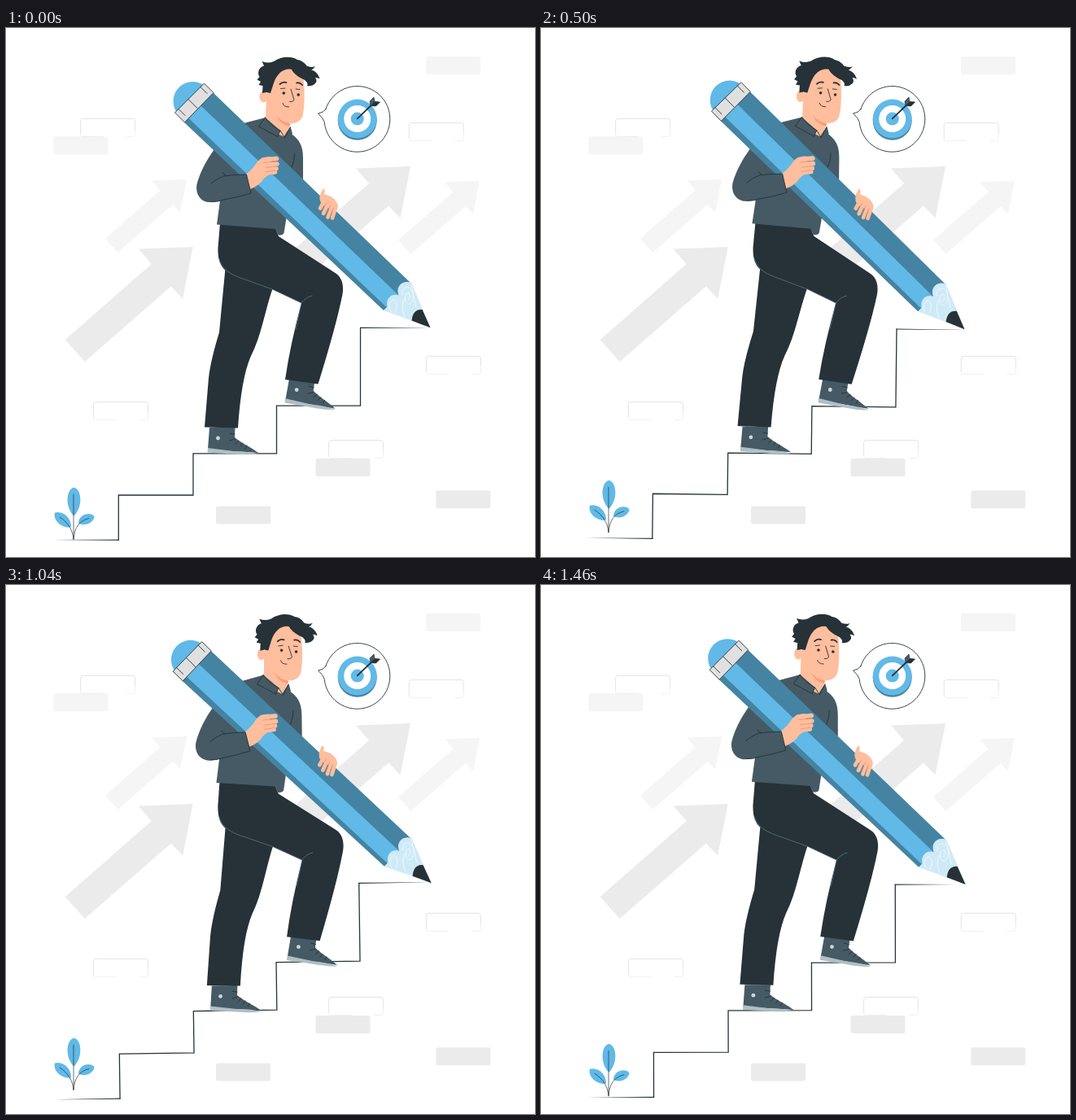
These frames come from a looping animation (650x650 px, 1.5 s). An HTML page:

```html
<!DOCTYPE html>
<html lang="en">
<head>
<meta charset="utf-8">
<title>Climbing to the goal</title>
<style>
  html, body { margin: 0; width: 100%; height: 100%; overflow: hidden; background: #fff; }
  svg { display: block; width: 100vw; height: 100vh; }
  .ink { fill: #263238; }
  .blue { fill: #61b9e7; }
  .deep { fill: #4583a2; }
  .shirt { fill: #455a64; }
  .skin { fill: #ffbe9d; }
  .line { fill: none; stroke: #263238; stroke-width: .9; stroke-linecap: round; stroke-linejoin: round; }
  .finger { fill: none; stroke: #ffbe9d; stroke-width: 5.6; stroke-linecap: round; }
  .crease { fill: none; stroke: #e58a68; stroke-width: .7; stroke-linecap: round; }
</style>
</head>
<body>
<svg viewBox="0 0 650 650">
  <defs>
    <path id="arrow" d="M0 0L-67 2.5L-51 21L-157 114L-133 141L-27 48.5L-12.5 63.5Z"/>
    <rect id="block" width="67" height="22" rx="2.5"/>
    <g id="card" fill="none" stroke="#e0e0e0">
      <path stroke-width=".9" d="M0 19V3Q0 0 3 0H64Q67 0 67 3V13"/>
      <path stroke-width=".5" d="M67 13V19Q67 22 64 22H56M28 22H3Q0 22 0 19"/>
    </g>
    <g id="shoe">
      <path class="shirt" d="M2-25H33.5L33-13C41-6 53-1 62 6L0 2Z"/>
      <path fill="#b0bec5" d="M0 0L32 4Q50 4 62.5 7.5Q50 9 32 7.5L-.5 5.5Z"/>
      <circle cx="12.5" cy="-12" r="2.4" fill="#cfd8dc"/>
      <path class="line" d="M27-18L33-17M27-9L33-11M34-5L38-9M40-2L43-6M46 1L48-3"/>
    </g>
  </defs>

  <g fill="#f5f5f5">
    <use href="#block" x="516" y="35"/>
    <use href="#block" x="58.3" y="133.3"/>
    <use href="#arrow" transform="translate(222 186) scale(.637)"/>
    <use href="#arrow" transform="translate(582 188) scale(.637)"/>
  </g>
  <g fill="#ebebeb">
    <use href="#block" x="380.5" y="529"/>
    <use href="#block" x="528.3" y="568.3"/>
    <use href="#block" x="258" y="587.4"/>
    <use href="#arrow" x="229.7" y="269"/>
    <use href="#arrow" x="497" y="170"/>
  </g>
  <use href="#card" x="91.6" y="111.4"/>
  <use href="#card" x="495.2" y="116.6"/>
  <use href="#card" x="516.3" y="403.3"/>
  <use href="#card" x="107.5" y="459.4"/>
  <use href="#card" x="396.6" y="506.6"/>

  <g id="bubble">
    <path class="line" style="fill:#fff" d="M392.8 100A40.4 40.4 0 1 1 391.2 115.5Q390 111 383.6 105Q390 104 392.8 100Z"/>
    <circle class="deep" cx="431.7" cy="113.8" r="24"/>
    <circle class="blue" cx="431.7" cy="111.6" r="24"/>
    <circle cx="431.7" cy="111.6" r="16.5" fill="#fff"/>
    <circle class="blue" cx="431.7" cy="111.6" r="8"/>
    <path class="line" style="stroke-width:1.8" d="M431.7 111.4L453 91"/>
    <path class="shirt" stroke="#263238" stroke-width=".7" d="M448 95.5L447 90L452 85L453 90.5L459.5 91L454.5 96Z"/>
    <path class="ink" d="M448 95.5L453 90.5L459.5 91L454.5 96Z"/>
  </g>

  <g id="stairs">
    <path class="line" style="stroke-width:1.3;stroke-linejoin:miter" d="M138.3 629V574H230V522.8H332.5V464.2H435.5V368.3"/>
    <path class="ink" d="M57 629.1L139 628.5V629.8ZM435 367.7L521 368.4L435 368.9Z"/>
  </g>

  <g id="climber">
    <use href="#shoe" x="248" y="516"/>
    <use href="#shoe" transform="translate(343.5 455.2) rotate(6)"/>
    <path class="ink" d="M270 290L262 374Q251 410 249 430L244 490.5L285 491.5Q289 430 301 403C314 378 318.5 345 329 316Z"/>
    <path class="ink" d="M263 240L331 246L335 256L403 300C412 305 415.5 314 413.5 327Q406 365 383.5 437.5L343 432Q349 390 363 338L327 321L284 306C266 299 260 290 260.5 270Z"/>
    <path class="line" style="stroke:#607d8b;stroke-width:.7" d="M262 284C266 297 275 302 288 307L327 321L363 338Q368 331 376 329M363 338L356 370"/>

    <path class="shirt" d="M285 119L294 116.5L319 110L349 129C361 137 365 145 365 160V200L345 230L341.5 252Q340 255 334.5 254.5L331 247L259 241.5L264 205L255 150Z"/>
    <path class="shirt" d="M259 145C247 160 238 178 234.5 192C232.5 203 238 212 248 214C258 215 275 209 301 203L296 180L286 165Z"/>
    <path class="line" d="M252 213.5Q260 214 268 211M354.5 154Q355 163 351 171"/>

    <g id="head">
      <path class="skin" d="M320 84L319 110Q325 128 342.5 134L349.5 118Z"/>
      <path fill="#ff9b74" d="M332 107Q338 116 349.5 117.5L348 121Q336 118 332 107Z"/>
      <ellipse class="skin" cx="316.5" cy="84.5" rx="5" ry="7"/>
      <path class="skin" d="M322 62C334 40 362 44 366 66C367 83 367 97 364.5 108C361 118 349 120 340 113Q330 107 320 92Z"/>
      <path class="ink" d="M315 80L315.5 71L310.5 70L313 66L308.5 63.5L311.5 60C308 55 311 48 317 46.5L314.5 41Q322 44 329 41C338 35 350 34 358 39Q365 40 369.5 46.5Q375 49 380 47Q377 51 375 51.5C380 52.5 384 57 385.5 62.5Q382 60.5 380 61Q383 65 380 68Q376 72 370 71Q372 68 367 64C361 61 354 57 351 51C342 49 333 55 328.5 69L325 80L320 79Z"/>
      <path class="line" style="stroke-width:1.8" d="M336.5 69Q340 65.5 344.5 67M357 67.5Q361 66.5 364 70"/>
      <path class="line" d="M337.5 74.5L343 74M356 75L361 75.5M350 75L354 88.5Q352 91.5 348.5 90.5M340 92.5Q341 97 347.5 97"/>
      <circle class="ink" cx="341.3" cy="80" r="1.8"/>
      <circle class="ink" cx="359.2" cy="82" r="1.8"/>
      <path class="shirt" d="M318.5 110L310.5 121L333.5 133.5L337 126ZM349.5 121L341 134L346 136L352 130Z"/>
      <path class="line" d="M318.5 110L310.5 121L333.5 133.5L337 126Q324 119 318.5 110M337 126L342.5 135L349 122"/>
    </g>

    <g id="pencil">
      <circle class="blue" cx="229.5" cy="90" r="24"/>
      <path class="deep" d="M254 79L498 314L464 347L219 116Z"/>
      <path class="blue" d="M239 95L483 329L469 344.5L224.5 111Z"/>
      <path fill="#cfeaf7" d="M498 313L521.5 368L464 347Q468 345 468.5 342C466 333 474 325 482.5 328.5C478 317 488 309 498 313Z"/>
      <path fill="none" stroke="#fff" stroke-width=".6" d="M473 349Q467 338 476 334Q483 337 478 350M490 355Q484 340 490 331M487 328C485 317 497 315 500 325C502 337 495 344 491 336Q489 327 495 325Q498 330 494 335M504 343L498 316"/>
      <path class="ink" d="M521.5 368.3L511.5 346Q500 345 498.5 359.5Z"/>
      <path fill="#e0e0e0" stroke="#263238" stroke-width=".9" stroke-linejoin="round" d="M207.5 104L243.5 68L255 79.5L219.5 116Z"/>
      <path class="line" d="M212 99.5L220 107.500M224 87.500L235 98.500M239 72.500L247 80.500"/>
    </g>

    <g id="hands">
      <path class="skin" d="M293 181Q303 174 309 164Q314 158 325 158L328 178Q318 182 314 189Q308 195 300 198Z"/>
      <path class="finger" d="M316 162L332.5 160.5M318 168L333 167M318 174L332 172.5M317 178L330.5 177"/>
      <path class="crease" d="M317 165.5L333 163.7M319 171.5L333 170M319 177L331 175"/>
      <path class="shirt" d="M266 182Q280 180 295.5 180L301 203L270 210.5Z"/>
      <path class="line" d="M268 211Q285 208 301 203L295.5 180Q280 180 267 182Q258 186 252 191M266 178L270 181"/>
      <path class="skin" d="M390 197Q393 199 391 204L399 207Q407 212 408 219L402 224L388 217Q382 208 390 197Z"/>
      <path class="finger" style="stroke-width:4.6" d="M392 211L386 221.500M397 213L390 228M402 216L395.500 232.500M405.500 220L401 233.500"/>
      <path class="crease" d="M394 215L388.5 223.5M398.5 218L393 229M402.5 221L398 232"/>
    </g>
  </g>

  <g id="plant">
    <path class="blue" d="M83.5 564.5C93.5 567 94.500 589 83.5 599.5C72.500 589 73.500 567 83.5 564.5ZM60 595.5C70 592.500 80.500 602 80 613C70 616 57 605 60 595.5ZM89 608.5C89 598 103 593.500 108.5 600C108 608 97 613 89 608.5Z"/>
    <path class="line" style="stroke-width:.7" d="M83 628.5V573M83 628C82 617 76 607 66 601M83 628C84 614 90 605 102 602.5"/>
  </g>
</svg>
<script>
  const LOOP = 1500;
  const get = id => document.getElementById(id);
  const stairs = get('stairs'), climber = get('climber'), plant = get('plant');

  // Triangle wave: 0 at p = 0, 1 at p = 0.25, -1 at p = 0.75
  const triangle = p => p < .25 ? 4 * p : p < .75 ? 2 - 4 * p : 4 * p - 4;
  const rotate = (el, angle, x, y) => el.setAttribute('transform', `rotate(${angle} ${x} ${y})`);

  function draw(now) {
    const p = now % LOOP / LOOP;
    const sway = triangle(p);
    rotate(stairs, sway, 290, 499);
    rotate(climber, sway, 363, 280);
    plant.setAttribute('transform', `translate(0 ${-13 * (1 - Math.abs(1 - 2 * p))})`);
    requestAnimationFrame(draw);
  }
  draw(performance.now());
</script>
</body>
</html>
```
